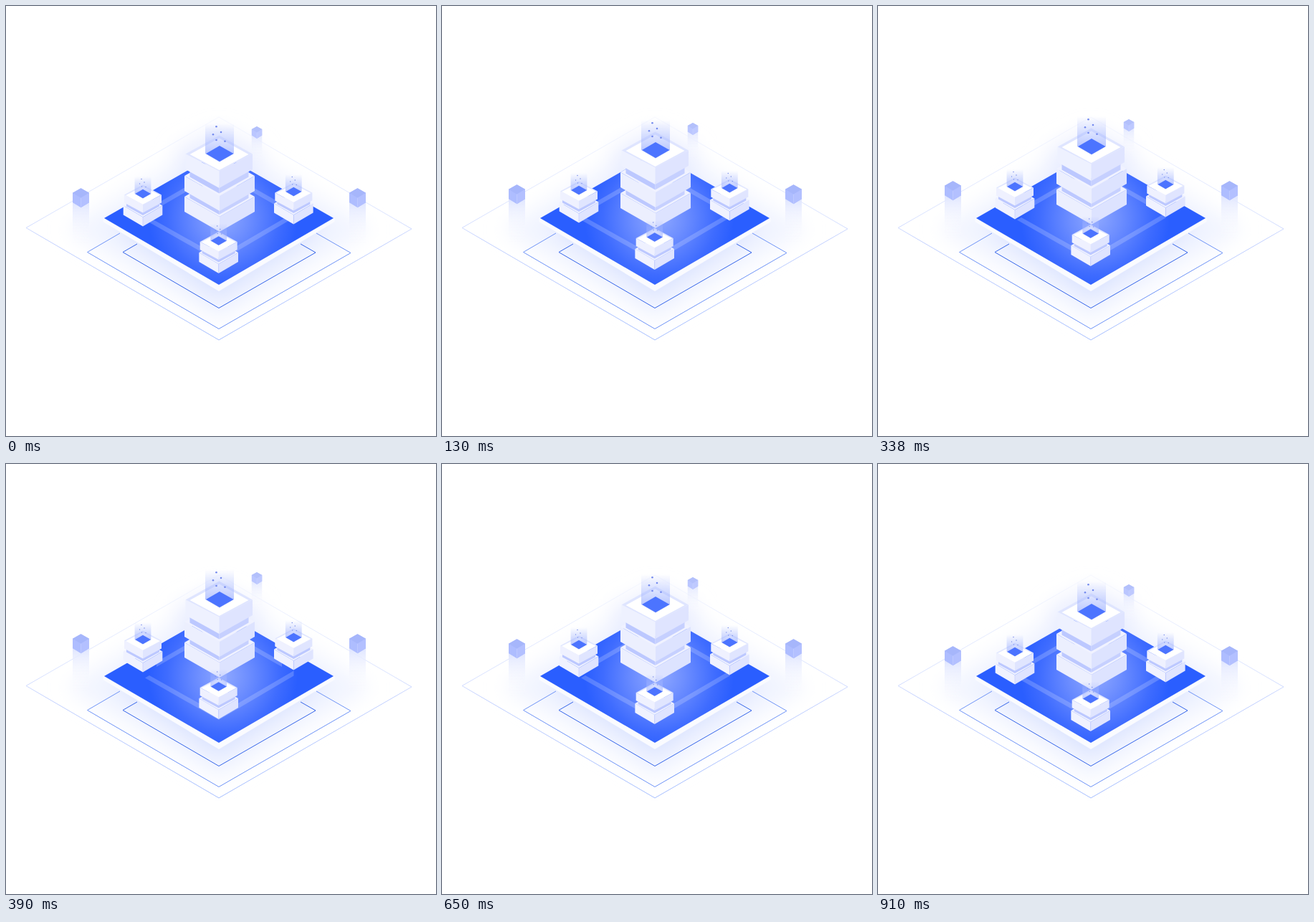
Recreate the animation shown at these times as an HTML page without scripts. Size 600x600 px, loop 1040 ms.

```html
<!DOCTYPE html>
<html lang="en">
<head>
<meta charset="utf-8">
<title>Isometric network</title>
<style>
  html, body { margin: 0; width: 100%; height: 100%; overflow: hidden; background: #fff; }
  svg { display: block; width: 100%; height: 100%; }
  .line { fill: none; stroke-width: 1; }
  .float { animation: float 1040ms step-end infinite; }
  @keyframes float {
    0%, 87.5%, 100% { transform: translateY(0); }
    12.5%, 75% { transform: translateY(-5px); }
    25%, 62.5% { transform: translateY(-10px); }
    37.5% { transform: translateY(-17px); }
  }
</style>
</head>
<body>
<svg viewBox="0 0 600 600">
  <defs>
    <radialGradient id="deck" gradientUnits="userSpaceOnUse" cx="303" cy="296" r="104">
      <stop offset="0" stop-color="#8fa8ff"/>
      <stop offset=".35" stop-color="#6c8dff"/>
      <stop offset=".75" stop-color="#3f6cff"/>
      <stop offset="1" stop-color="#2a5eff"/>
    </radialGradient>
    <linearGradient id="outer" gradientUnits="userSpaceOnUse" x1="0" y1="155" x2="0" y2="466">
      <stop offset="0" stop-color="#f6f8ff"/>
      <stop offset=".45" stop-color="#d9e2ff"/>
      <stop offset=".55" stop-color="#c3d1ff"/>
      <stop offset="1" stop-color="#a4bdff"/>
    </linearGradient>
    <linearGradient id="column" x2="0" y2="1">
      <stop offset="0" stop-color="#a9baff" stop-opacity="0"/>
      <stop offset=".4" stop-color="#a9baff" stop-opacity=".4"/>
      <stop offset="1" stop-color="#94a9ff" stop-opacity=".85"/>
    </linearGradient>
    <linearGradient id="beam" x2="0" y2="1">
      <stop offset="0" stop-color="#dfe5ff"/>
      <stop offset="1" stop-color="#fff" stop-opacity="0"/>
    </linearGradient>
    <filter id="soft" x="-30%" y="-40%" width="160%" height="180%"><feGaussianBlur stdDeviation="14"/></filter>

    <!-- wide slab, origin at the centre of its top face -->
    <g id="slab">
      <path fill="#f0f2ff" d="M-49 0 0-28 49 0 0 28z"/>
      <path fill="#eceffe" d="M-49 0 0 28V49L-49 21z"/>
      <path fill="#dde3ff" d="M49 0 0 28V49L49 21z"/>
    </g>
    <g id="gap">
      <path fill="#bcc8ff" d="M-41-10 0 12V23L-41 0z"/>
      <path fill="#c6d0ff" d="M41-10 0 12V23L41 0z"/>
    </g>

    <!-- lit pit, origin at its centre -->
    <g id="pit">
      <path fill="url(#column)" d="M-20-42H20V0L0 11.5-20 0z"/>
      <path fill="#4c74ff" d="M-19 0 0-11 19.5 0 0 11z"/>
    </g>

    <g id="node">
      <path fill="#f0f2ff" d="M-27.3 15 0 0 27.3 15 0 31z"/>
      <path fill="#f0f2ff" d="M-27.3 15 0 31V44L-27.3 28z"/>
      <path fill="#dfe4ff" d="M27.3 15 0 31V44L27.3 28z"/>
      <path stroke="#c6ceff" stroke-width=".7" d="M0 31V43"/>
      <path fill="#bcc8ff" d="M-23 9 0 22 23 9V16L0 28.5-23 16z"/>
      <path fill="#e0e6ff" d="M-26 0 0-14 26 0 0 13.5z"/>
      <path fill="#fff" d="M-24 .5 0-11.5 24 .5 0 13.5z"/>
      <path fill="#eff1ff" d="M-26 0 0 13.5V25L-26 11z"/>
      <path fill="#e0e5ff" d="M26 0 0 13.5V25L26 11z"/>
      <use href="#pit" transform="translate(0 -1.5) scale(.57)"/>
      <g fill="#7d92ea">
        <circle cx="-2" cy="-22" r=".8"/><circle cx="2" cy="-17.500" r=".8"/>
        <circle cx="-4.500" cy="-15.500" r=".7"/><circle cx="-1.500" cy="-11.500" r=".7"/>
        <circle cx="4" cy="-11" r=".7"/>
      </g>
    </g>

    <g id="cube">
      <path fill="url(#beam)" d="M-11.500 6H11.500V66H-11.500z"/>
      <path fill="#aebdff" d="M0-13.500 11.500-7V6.500L0 13.500-11.500 6.500V-7z"/>
      <path fill="#a6b6fb" d="M0-13.500 11.500-7 0 0-11.500-7z"/>
      <path fill="#b3c0ff" d="M11.500-7V6.500L0 13.500V0z"/>
      <path stroke="#c5cfff" stroke-width=".7" d="M0 0V13"/>
    </g>
  </defs>

  <!-- ground glow -->
  <g filter="url(#soft)">
    <path fill="#f1f4ff" d="M85 312 297 180 509 312 297 440z"/>
    <path fill="#d9e2ff" d="M150 310 297 225 444 310 297 408z"/>
    <path fill="#eaeeff" d="M238 200 297 172 356 200V250H238z"/>
  </g>

  <path class="line" stroke="url(#outer)" d="M28 309.500 297 155 566 311 297 466z"/>
  <path class="line" stroke="#6f94f7" d="M159 317 113.500 343.500 297 450.500 481 344.500 433 317"/>
  <path class="line" stroke="#3565ea" d="M183 332 163 343.500 297 421.500 432 344 411 332"/>

  <!-- deck -->
  <path fill="#fafbff" d="M135.500 296 297 388 458.500 296V301L297 398 135.500 301z"/>
  <path fill="url(#deck)" d="M137 296 297 204.500 457 296 297 389z"/>
  <path fill="#fff" fill-opacity=".19" d="M194 298.500 200 295 297 349.500 401.500 288.500V295.500L297 357z"/>
  <path fill="#fff" fill-opacity=".19" d="M210 276 297 226 385 276V283L297 233 210 283z"/>

  <g class="float">
    <use href="#cube" x="104.500" y="267.700"/>
    <use href="#cube" x="490.500" y="267.700"/>
    <use href="#cube" transform="translate(350 176.500) scale(.63)" opacity=".85"/>

    <!-- main tower -->
    <use href="#slab" x="298" y="266"/>
    <use href="#gap" x="297.500" y="268"/>
    <use href="#slab" x="298" y="237"/>
    <use href="#gap" x="297.500" y="238.500"/>
    <g transform="translate(297.500 206.500)">
      <path fill="#dfe5ff" d="M-47 0 0-26 46.500 0 0 24z"/>
      <path fill="#fff" d="M-41 .5 0-22 41 .5 0 22.500z"/>
      <path fill="#eef1ff" d="M-47 0 0 24V47.500L-47 21.500z"/>
      <path fill="#dfe4ff" d="M46.500 0 0 24V47.500L46.500 21.500z"/>
    </g>
    <use href="#pit" x="298" y="206"/>
    <g fill="#7389ee">
      <circle cx="293.500" cy="168.300" r="1.300"/><circle cx="300" cy="176" r="1.300"/>
      <circle cx="289" cy="179.300" r="1.300"/><circle cx="293.500" cy="187" r="1.300"/>
      <circle cx="305.500" cy="188.800" r="1.300"/>
    </g>

    <use href="#node" x="191" y="263.500"/>
    <use href="#node" x="401.300" y="260.500"/>
    <use href="#node" x="296.700" y="329"/>
  </g>
</svg>
</body>
</html>
```
